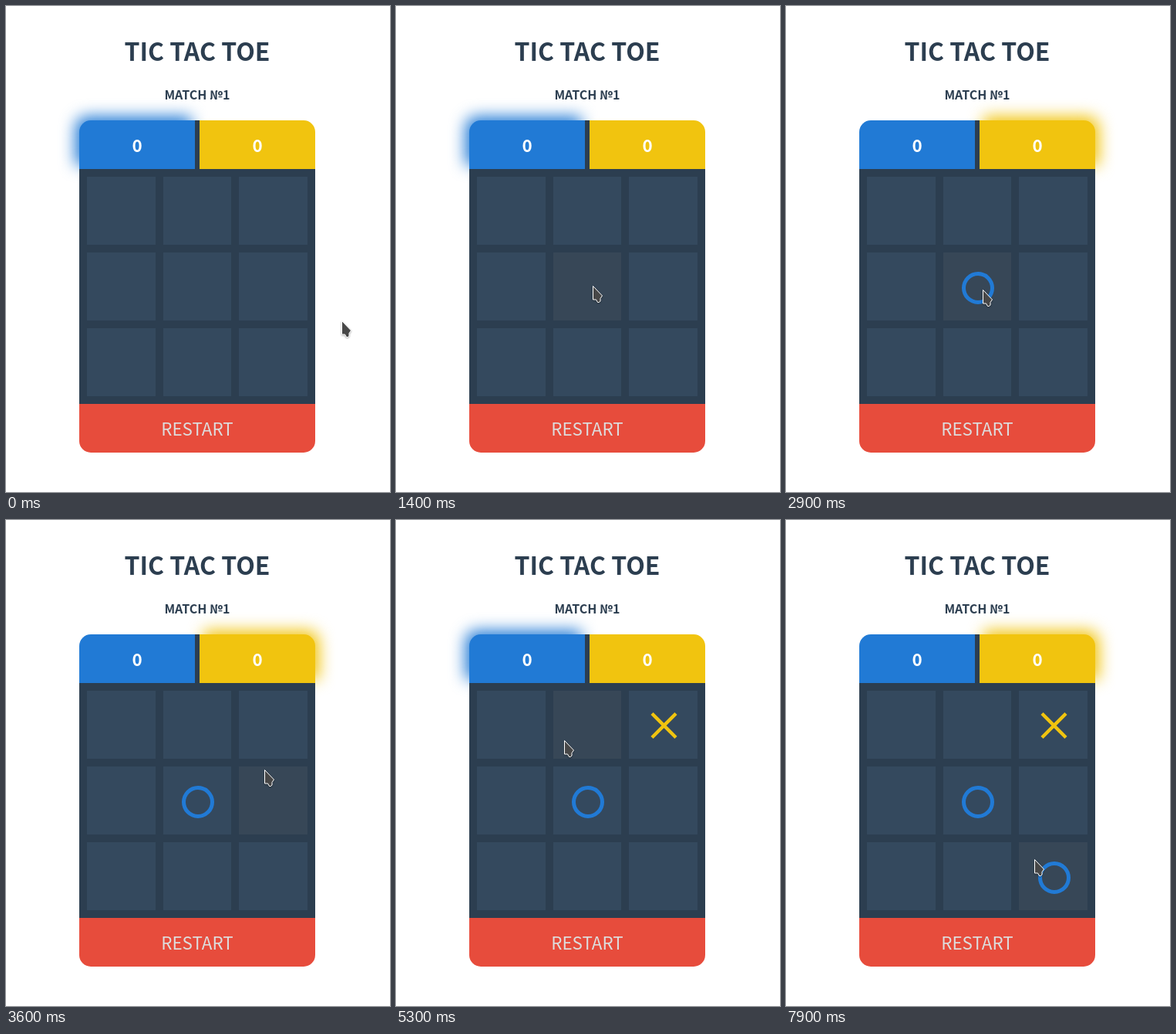
An HTML page for the animation above (8 s loop, 498x629 px).

```html
<!DOCTYPE html>
<html lang="en">
<head>
<meta charset="utf-8">
<title>Tic Tac Toe</title>
<style>
  html, body { margin: 0; width: 100%; height: 100%; overflow: hidden; background: #fff; }
  svg, p { position: absolute; left: 0; top: 0; margin: 0; }
  p {
    left: 95px; width: 306px; text-align: center; white-space: nowrap;
    font-family: "Noto Sans CJK JP", "Noto Sans CJK SC", "Open Sans", sans-serif;
  }
  .heading { font-weight: 700; color: #2c3e50; }
  .title { top: 34px; font-size: 32px; }
  .match { top: 102px; font-size: 16px; }
  .score { top: 163px; width: 150px; font-weight: 700; font-size: 22.4px; color: #fff; }
  .second { left: 251px; }
  .restart { top: 530px; font-size: 22.4px; color: #ddd; }
  .glow { filter: blur(10px); }
  .blue { fill: #217ad5; }
  .yellow { fill: #f1c40f; }
  .ring { fill: none; stroke: #217ad5; stroke-width: 5; }
  .cross { stroke: #f1c40f; stroke-width: 4.5; }
</style>
</head>
<body>
<svg width="498" height="629" viewBox="0 0 498 629">
  <defs>
    <path id="left" d="M95 211V163a15 15 0 0 1 15-15H245V211Z"/>
    <path id="right" d="M251 211V148H386a15 15 0 0 1 15 15V211Z"/>
  </defs>
  <use id="blueGlow" class="glow blue" href="#left" x="-5" y="-5"/>
  <use id="yellowGlow" class="glow yellow" href="#right" x="5" y="-5"/>
  <path d="M95 211H245V148H251V211H401V515H95Z" fill="#2c3e50"/>
  <use class="blue" href="#left"/>
  <use class="yellow" href="#right"/>
  <path d="M95 515H401V563a15 15 0 0 1-15 15H110a15 15 0 0 1-15-15Z" fill="#e74c3c"/>
  <g id="cells" shape-rendering="crispEdges"></g>
  <g id="marks"></g>
</svg>

<p class="heading title">TIC TAC TOE</p>
<p class="heading match">MATCH №1</p>
<p class="score">0</p>
<p class="score second">0</p>
<p class="restart">RESTART</p>

<svg width="498" height="629" viewBox="0 0 498 629">
  <path id="cursor" d="M0 0V17.5H4L6 21H8L9.5 19.5V16L12 12.5Z"
        fill="#474747" stroke="#fff" stroke-linejoin="round"
        style="filter: drop-shadow(0 1px 1px #0005)"/>
</svg>
<script>
const LOOP = 8000, STEP = 100;
const CELL = { w: 266 / 3, h: 88, gap: 10, x: 105, y: 221 };
const byId = id => document.getElementById(id);

function add(parent, tag, attrs) {
  const el = document.createElementNS("http://www.w3.org/2000/svg", tag);
  for (const key in attrs) el.setAttribute(key, attrs[key]);
  return byId(parent).appendChild(el);
}

const cells = Array.from({ length: 9 }, (_, i) => {
  const x = CELL.x + (i % 3) * (CELL.w + CELL.gap);
  const y = CELL.y + Math.floor(i / 3) * (CELL.h + CELL.gap);
  return { x, y, el: add("cells", "rect", { x, y, width: CELL.w, height: CELL.h }) };
});

// Marks sit slightly below the middle of their cell.
const shapes = {
  ring: (cx, cy) => add("marks", "circle", { class: "ring", cx, cy, r: 18.5 }),
  cross: (x, y) => add("marks", "path", {
    class: "cross", d: `M${x - 15.5} ${y - 15.5}l31 31m0-31l-31 31`
  })
};
const mark = (time, shape, x, y) => ({ time, el: shapes[shape](x, y) });
const moves = [
  mark(2800, "ring", 249, 365),
  mark(4200, "cross", 347.5, 266),
  mark(7100, "ring", 348, 463)
];

// Each stroke eases from the previous resting point to (x, y), bowed sideways.
const stroke = (start, end, x, y, bow = 0) => ({ start, end, x, y, bow });
const home = { x: 435, y: 407 };
const strokes = [
  stroke(0, 300, 420, 451, -25),
  stroke(500, 900, 341, 373),
  stroke(1100, 1400, 255, 362),
  stroke(1400, 2000, 290, 380, 28),
  stroke(2000, 2120, 397, 370),
  stroke(2120, 2600, 276, 366, 10),
  stroke(2700, 2900, 255, 367),
  stroke(3200, 3900, 340, 281, 32),
  stroke(4300, 5300, 218, 285),
  stroke(5300, 6100, 331, 443),
  stroke(7800, 7900, 322, 439)
];
const easeOut = t => 1 - (1 - t) ** 1.5;

function tipAt(time) {
  let from = home;
  for (const to of strokes) {
    if (time <= to.start) break;
    if (time < to.end) {
      const k = easeOut((time - to.start) / (to.end - to.start));
      const dx = to.x - from.x, dy = to.y - from.y;
      const side = to.bow * 4 * k * (1 - k) / Math.hypot(dx, dy);
      return {
        x: Math.round(from.x + dx * k - dy * side),
        y: Math.round(from.y + dy * k + dx * side)
      };
    }
    from = to;
  }
  return from;
}

function draw(time) {
  const { x, y } = tipAt(time);
  byId("cursor").setAttribute("transform", `translate(${x + 0.5} ${y + 0.5})`);
  for (const cell of cells) {
    const over = x >= cell.x && x < cell.x + CELL.w && y >= cell.y && y < cell.y + CELL.h;
    cell.el.setAttribute("fill", over ? "#374757" : "#34495e");
  }
  let played = 0;
  for (const { time: start, el } of moves) {
    const shown = time >= start;
    el.style.display = shown ? "" : "none";
    played += shown;
  }
  byId("blueGlow").style.display = played % 2 ? "none" : "";
  byId("yellowGlow").style.display = played % 2 ? "" : "none";
}

const origin = performance.now();
function tick() {
  const time = (performance.now() - origin) % LOOP;
  draw(Math.floor(time / STEP) * STEP);
  requestAnimationFrame(tick);
}
tick();
</script>
</body>
</html>
```
